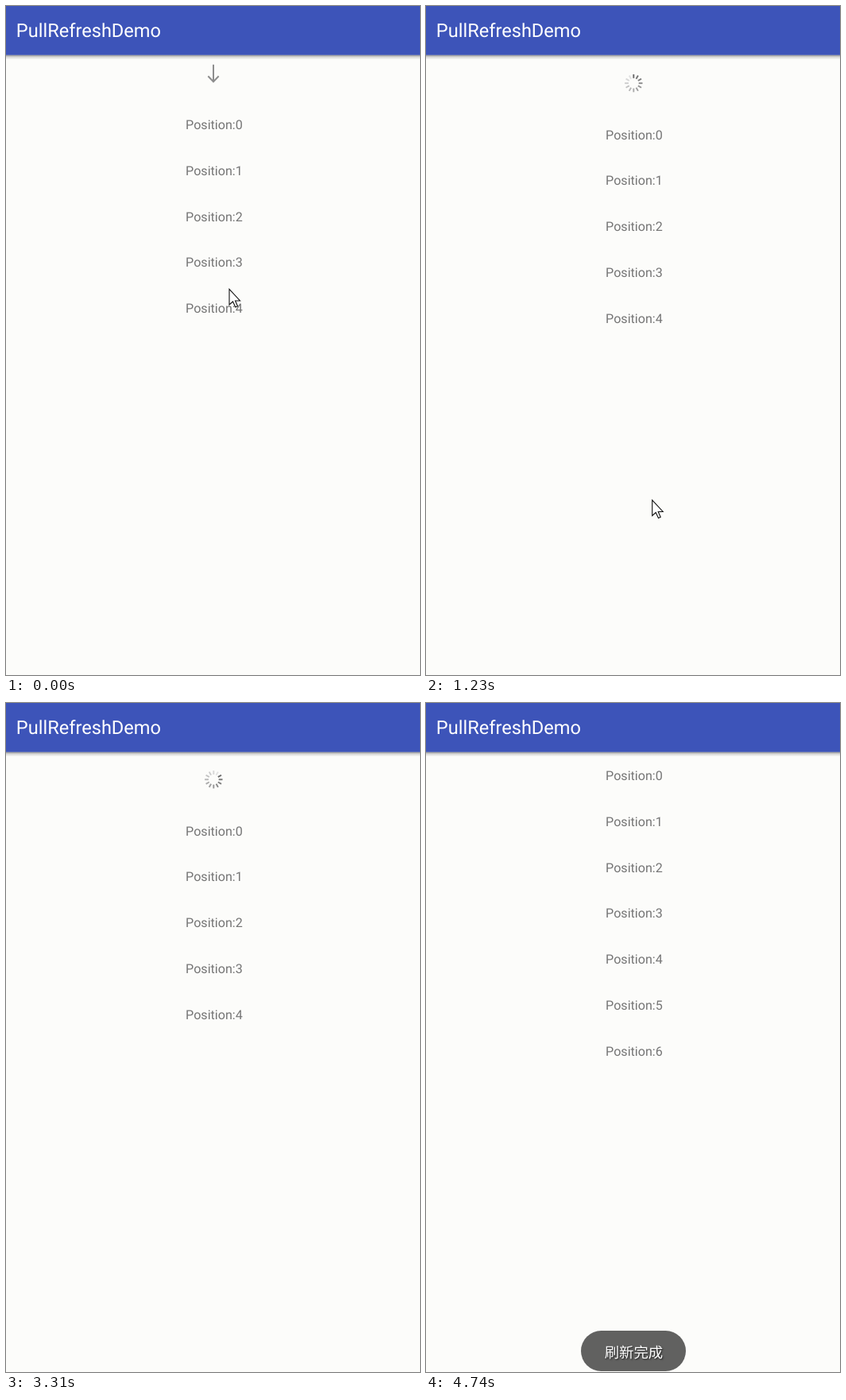
An HTML page that plays this animation: 521x842 px, repeating every 4820 ms.

```html
<!DOCTYPE html>
<html lang="en">
<head>
<meta charset="utf-8">
<title>Pull to refresh</title>
<style>
  html, body { margin: 0; width: 100%; height: 100%; overflow: hidden; background: #fcfcfa; }
  svg { display: block; width: 521px; height: 842px; }
  text { font-family: Roboto, sans-serif; text-rendering: geometricPrecision; }
  #rows { font-size: 16.1px; fill: #757575; }
  #title { font-size: 23.6px; fill: #fff; }
  #arrow { fill: none; stroke: #8e8e8e; stroke-width: 2; }
  #spinner { stroke-width: 1.9; }
  #toast text {
    font: 18.4px "Noto Sans CJK SC", "Noto Sans CJK", sans-serif;
    fill: #fff;
    text-shadow: 1px 1px 2px rgba(0, 0, 0, .7);
  }
</style>
</head>
<body>
<svg viewBox="0 0 521 842">
  <defs>
    <linearGradient id="shade" x2="0" y2="1">
      <stop offset="0" stop-opacity=".48"/>
      <stop offset=".4" stop-opacity=".16"/>
      <stop offset="1" stop-opacity="0"/>
    </linearGradient>
  </defs>
  <rect width="521" height="842" fill="#fcfcfa"/>
  <g id="rows"></g>
  <path id="arrow" d="M0-11V10.5M-6.7 3.5L0 10.4L6.7 3.5"/>
  <g id="spinner"></g>
  <rect y="61.5" width="521" height="6" fill="url(#shade)"/>
  <rect width="521" height="61.7" fill="#3d54b9"/>
  <text id="title" x="12.8" y="38.8">PullRefreshDemo</text>
  <g id="toast">
    <rect x="195" y="790" width="132" height="51" rx="25.5" fill="#616160"/>
    <text x="224.7" y="823.5">刷新完成</text>
  </g>
  <path id="cursor" d="M.5.5V20L5 16L8.3 23L11 21.8L8 15H14Z" fill="#fff" stroke="#111" stroke-width="1.1"/>
</svg>
<script>
const LOOP = 4820;
const ROW_STEP = 57.75;
const DRAG_TICK = 130, SPIN_TICK = 146.5;
const DRAG_END = 650, RELEASE = 930, LOADED = 3860;
const RELEASE_SETTLE = 836, LOADED_SETTLE = 3773;
const POINTER_LEAVES = 2100, POINTER_GONE = 2248;

// centre of the first row: list at rest, header held open, pull at start, full pull
const REST = 91.5, OPEN = 161, GRABBED = 149.5, PULLED = 232;

const $ = id => document.getElementById(id);
const make = (tag, parent, attrs) => {
  const el = document.createElementNS('http://www.w3.org/2000/svg', tag);
  for (const key in attrs) el.setAttribute(key, attrs[key]);
  return parent.appendChild(el);
};
const place = (el, x, y, angle = 0) =>
  el.setAttribute('transform', `translate(${x} ${y}) rotate(${angle})`);
const show = (el, on) => el.setAttribute('visibility', on ? 'visible' : 'hidden');

const clamp = u => Math.min(1, Math.max(0, u));
const floorTo = (t, step) => Math.floor(t / step) * step;
const glide = (u, bend) => u + bend * u * u * (1 - u);
// share of a scroll still left to go
const settle = (t, from) => Math.exp(-((Math.max(0, t - from) / 185) ** 2));

const rows = Array.from({ length: 7 }, (_, i) => {
  const row = make('text', $('rows'), { x: 226.1, y: 5.7 + i * ROW_STEP });
  row.textContent = 'Position:' + i;
  return row;
});
for (let i = 0; i < 12; i++) {
  const gray = 105 + i * 11;
  make('path', $('spinner'), {
    d: 'M0-11.2V-6.4',
    stroke: `rgb(${gray},${gray},${gray})`,
    transform: `rotate(${i * 30})`
  });
}

function draw(time) {
  const released = time >= RELEASE;
  // the picture advances in steps, slower while the spinner runs
  const t = released
    ? RELEASE + floorTo(time - RELEASE, SPIN_TICK)
    : floorTo(time, DRAG_TICK);
  const drag = clamp(t / DRAG_END);

  const y = REST
    + (OPEN - REST) * settle(t, LOADED_SETTLE)
    + (PULLED - OPEN) * settle(t, RELEASE_SETTLE)
    - (PULLED - GRABBED) * (1 - glide(drag, .555));
  place($('rows'), 0, y);
  rows.forEach((row, i) => show(row, i < 5 || t >= LOADED));

  const headerY = y - 64.7;
  place($('arrow'), 261, headerY, y > OPEN ? 180 : 0);
  show($('arrow'), !released);
  place($('spinner'), 261.3, headerY, 300 + 30 * Math.round((t - RELEASE) / SPIN_TICK));
  show($('spinner'), released);

  const leaving = t >= POINTER_LEAVES;
  place($('cursor'),
    280.5 + 3.7 * drag + (leaving ? 92 : 0),
    356 + 265.5 * glide(drag, .85) - (leaving ? 3 : 0));
  show($('cursor'), t < POINTER_GONE);

  const fade = clamp((t - 3900) / 400);
  $('toast').setAttribute('opacity', 1 - (1 - fade) ** 2);
}

const start = performance.now();
function frame() {
  draw((performance.now() - start) % LOOP);
  requestAnimationFrame(frame);
}
frame();
</script>
</body>
</html>
```
